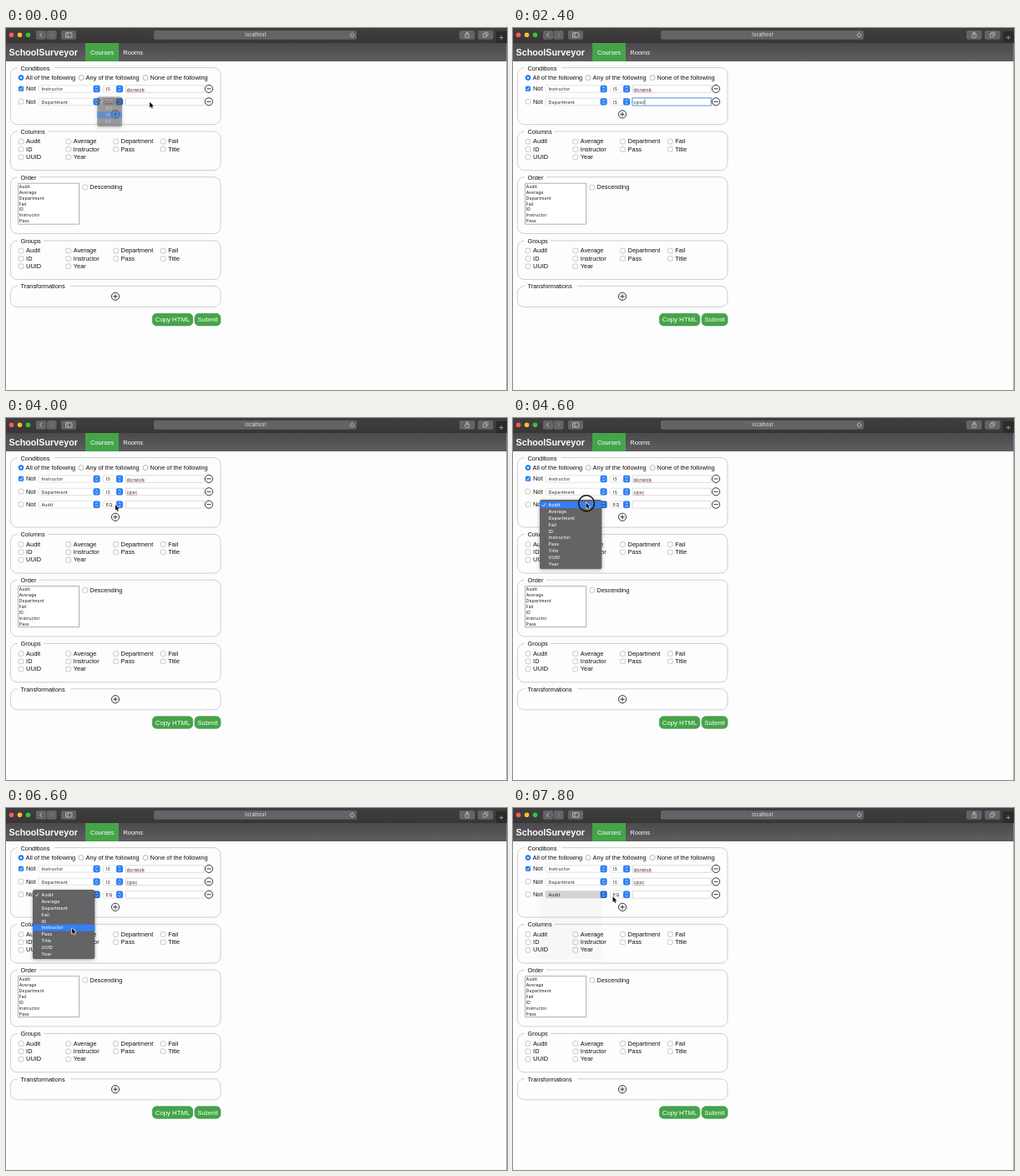
Animation of 600 by 434 pixels, one loop 8000 ms. Source, as an HTML page with a canvas:

```html
<!DOCTYPE html>
<html lang="en">
<head>
<meta charset="utf-8">
<title>Course search</title>
<style>
html, body { margin: 0; width: 100%; height: 100%; overflow: hidden; background: #fefdfe; }
canvas { display: block; width: 600px; height: 434px; }
</style>
</head>
<body>
<canvas id="stage"></canvas>
<script>
const LOOP = 8000, STEP = 200, ROW = 15.4, ITEM = 7.87;
const GREEN = '#45a449', BLUE = '#2b7ff6';
const SANS = '"Liberation Sans", Arial, sans-serif', UI = 'Inter, sans-serif';
const FIELDS = ['Audit', 'Average', 'Department', 'Fail', 'ID', 'Instructor', 'Pass', 'Title', 'UUID', 'Year'];
const OPS = ['EQ', 'GT', 'IS', 'LT'];

// Pointer path: time, x, y
const PATH = [
  [0, 172, 88.7], [3000, 172, 88.7], [3600, 131, 104], [4000, 131, 104],
  [4400, 88, 102], [4600, 87.5, 101.5], [5200, 86, 104], [5800, 79.5, 126.5],
  [6400, 79, 147], [6600, 79, 144], [7200, 79, 113.5], [7600, 103, 109],
  [7800, 119.5, 106], [8000, 119.5, 106]
];

const canvas = document.getElementById('stage');
const dpr = window.devicePixelRatio || 1;
canvas.width = 600 * dpr;
canvas.height = 434 * dpr;
const c = canvas.getContext('2d');

function pointer(t) {
  const i = PATH.findIndex(p => p[0] > t);
  const [t0, x0, y0] = PATH[i - 1], [t1, x1, y1] = PATH[i];
  const k = (t - t0) / (t1 - t0);
  return { x: x0 + (x1 - x0) * k, y: y0 + (y1 - y0) * k };
}

function box(x, y, w, h, r, fill, stroke, lw = 0.7) {
  c.beginPath();
  c.roundRect(x, y, w, h, r);
  paint(fill, stroke, lw);
}

function circle(x, y, r, fill, stroke, lw = 0.7) {
  c.beginPath();
  c.arc(x, y, r, 0, 7);
  paint(fill, stroke, lw);
}

function line(points, stroke, lw = 0.8) {
  c.beginPath();
  for (let i = 0; i < points.length; i += 2) c.lineTo(points[i], points[i + 1]);
  paint(null, stroke, lw);
}

function paint(fill, stroke, lw) {
  if (fill) { c.fillStyle = fill; c.fill(); }
  if (stroke) { c.strokeStyle = stroke; c.lineWidth = lw; c.stroke(); }
}

// Text whose capitals are centred on y
function text(str, x, y, color = '#111', size = 7.4, weight = 400, align = 'left') {
  c.font = `${weight} ${size}px ${SANS}`;
  c.letterSpacing = '0px';
  put(str, x, y + size * 0.36, color, align);
}

function small(str, x, y, color = '#222', size = 5.3, weight = 400, align = 'left') {
  c.font = `${weight} ${size}px ${UI}`;
  c.letterSpacing = '0.2px';
  put(str, x, y + size * 0.36, color, align);
}

function put(str, x, y, color, align) {
  c.fillStyle = color;
  c.textAlign = align;
  c.fillText(str, x, y);
}

function shade(y0, y1, top, bottom) {
  const g = c.createLinearGradient(0, y0, 0, y1);
  g.addColorStop(0, top);
  g.addColorStop(1, bottom);
  return g;
}

function browser() {
  box(0, 0, 600, 18, 0, shade(0, 18, '#403e3f', '#383637'));
  ['#fc5b57', '#fdbc2f', '#2bc840'].forEach((color, i) => circle(6.5 + i * 10, 8.2, 2.8, color));
  const face = '#656365', ink = '#dedede';
  [[36, 12], [48.6, 12], [66, 18], [543, 18.5], [565, 18.5]].forEach(([x, w]) => box(x, 3, w, 10.8, 2, face));
  line([43, 5.8, 40.6, 8.3, 43, 10.8], ink);
  line([53.6, 5.8, 56, 8.3, 53.6, 10.8], '#929092');
  box(71.5, 5.7, 7.4, 5.4, 0.6, null, ink);
  line([74, 5.7, 74, 11.1], ink, 0.7);
  box(550, 7, 4.6, 4.4, 0.4, null, ink, 0.6);
  line([552.3, 9, 552.3, 4.6], ink, 0.6);
  line([550.9, 6, 552.3, 4.5, 553.7, 6], ink, 0.6);
  box(573, 5.2, 4, 4, 0.4, null, ink, 0.6);
  box(571.3, 7, 4, 4, 0.4, face, ink, 0.6);
  box(177, 3, 243, 10.8, 2, face);
  small('localhost', 299, 8.4, '#f2f2f2', 5.5, 400, 'center');
  c.beginPath();
  c.arc(414.6, 8.6, 2.2, -0.6, 4.6);
  paint(null, ink, 0.7);
  line([414.3, 5.2, 415.6, 6.4, 414.3, 7.5], ink, 0.6);
  box(587, 4, 13, 14, 0, '#2c2a2b');
  line([590.7, 11.5, 595.7, 11.5], '#b5b5b5', 0.7);
  line([593.2, 9, 593.2, 14], '#b5b5b5', 0.7);

  box(0, 18, 600, 22, 0, shade(18, 40, '#4b494b', '#5f5d60'));
  text('SchoolSurveyor', 3.5, 28.8, '#fff', 10.75, 700);
  box(95, 18, 40, 22, 0, GREEN);
  text('Courses', 115, 29, '#fff', 7.5, 400, 'center');
  text('Rooms', 152.2, 29, '#fff', 7.5, 400, 'center');
  line([599.6, 18, 599.6, 434], '#8a8a8a', 0.8);
}

function fieldset(title, y, h, gap) {
  box(5.4, y, 251.6, h, 8, null, '#c9c9c9', 0.9);
  box(14, y - 2, gap, 4, 0, '#fefdfe');
  text(title, 17.5, y + 0.3);
}

function checkbox(x, y, on) {
  box(x - 2.8, y - 2.8, 5.6, 5.6, 1.2, on ? '#1a7cf8' : '#fff', on ? '#1a7cf8' : '#a5a5a5', 0.6);
  if (on) line([x - 1.5, y + 0.1, x - 0.3, y + 1.5, x + 1.6, y - 1.6], '#fff', 0.9);
}

function radio(x, label, on) {
  circle(x, 59.6, 3, on ? '#1a7cf8' : '#fff', on ? '#1a7cf8' : '#999');
  if (on) circle(x, 59.6, 1.2, '#fff');
  text(label, x + 5.6, 59.3);
}

function sign(x, y, plus, color = '#222') {
  circle(x, y, 4.6, null, color, 0.9);
  line([x - 2.6, y, x + 2.6, y], color, 0.9);
  if (plus) line([x, y - 2.6, x, y + 2.6], color, 0.9);
}

function select(label, x, w, y, pressed) {
  box(x, y - 4.1, w, 8.2, 2, pressed ? '#d8d8d8' : '#fff', '#d2d2d2', 0.6);
  const s = x + w - 8;
  box(s, y - 4.2, 8, 8.4, 2, pressed ? '#2068d8' : BLUE);
  line([s + 2.6, y - 0.9, s + 4, y - 2.4, s + 5.4, y - 0.9], '#fff', 0.7);
  line([s + 2.6, y + 0.9, s + 4, y + 2.4, s + 5.4, y + 0.9], '#fff', 0.7);
  small(label, x + 3.4, y + 0.3);
}

function condition(i, { field, op, value, on, focus, caret, marked, pressed }) {
  const y = 73 + i * ROW;
  checkbox(18, y - 0.2, on);
  text('Not', 24, y - 0.4);
  select(field, 39, 73.5, y, pressed === 'field');
  select(op, 116.4, 23.6, y, pressed === 'op');
  if (focus) box(142.6, y - 4.8, 95, 9.6, 0.8, null, '#8dbcf3', 1.3);
  box(143.3, y - 4.2, 93.6, 8.5, 0, '#fff', focus ? '#7c9cc4' : '#c4c4c4', 0.6);
  small(value, 144.6, y + 0.6);
  const end = 144.6 + c.measureText(value).width;
  if (caret) line([end + 0.4, y - 2.8, end + 0.4, y + 3.4], '#111', 0.6);
  if (marked) {
    c.setLineDash([0.9, 0.7]);
    line([144.8, y + 3.8, end, y + 3.8], '#ee5a50', 0.8);
    c.setLineDash([]);
  }
  sign(243, y - 0.1, false);
}

function checkGrid(y) {
  FIELDS.forEach((name, i) => {
    const x = 18 + (i % 4) * 56.75, cy = y + 12 + Math.floor(i / 4) * 9.35;
    checkbox(x, cy + 0.1);
    text(name, x + 6.1, cy - 0.4);
  });
}

function button(label, x, w, y) {
  box(x, y, w, 14.6, 5, GREEN, '#3b9640', 0.6);
  text(label, x + w / 2, y + 7.2, '#fff', 7.8, 400, 'center');
}

function menu(items, x, y, w, hover, alpha) {
  c.save();
  c.globalAlpha = alpha;
  c.shadowColor = 'rgba(0,0,0,.35)';
  c.shadowBlur = 4 * dpr;
  c.shadowOffsetY = dpr;
  box(x, y, w, items.length * ITEM + 4.4, 2.6, '#636264');
  c.shadowColor = 'transparent';
  if (hover >= 0) box(x, y + 2.2 + hover * ITEM, w, ITEM, 0, '#3580f7');
  items.forEach((name, i) => small(name, x + 10.6, y + 6.2 + i * ITEM, '#fff', 5.2, 500));
  line([x + 3.2, y + 6.3, x + 4.6, y + 8, x + 7, y + 4.2], '#fff', 0.8);
  c.restore();
}

function drawPointer({ x, y }, kind) {
  c.save();
  c.translate(x, y);
  c.lineJoin = 'round';
  if (kind === 'beam') {
    line([-1.4, -3.6, 0, -3, 1.4, -3.6], '#222', 0.6);
    line([0, -3, 0, 4.4], '#222', 0.7);
    line([-1.4, 5, 0, 4.4, 1.4, 5], '#222', 0.6);
  } else if (kind === 'hand') {
    c.beginPath();
    c.roundRect(-0.7, 0, 1.6, 5, 0.8);
    c.roundRect(-2, 3.4, 5.4, 4.6, 1.6);
    paint('#111', '#111', 0.9);
    box(-0.5, 0.3, 1.2, 5, 0.6, '#fff');
    box(-1.6, 3.8, 4.6, 3.8, 1.2, '#fff');
  } else {
    c.beginPath();
    [0, 0, 0, 6.8, 1.6, 5.4, 2.7, 7.9, 3.8, 7.4, 2.8, 5, 4.9, 4.9]
      .forEach((v, i, a) => { if (i % 2) c.lineTo(a[i - 1], v); });
    c.closePath();
    paint(null, '#fff', 1.2);
    paint('#111');
  }
  c.restore();
}

function draw(t) {
  c.setTransform(dpr, 0, 0, dpr, 0, 0);
  box(0, 0, 600, 434, 0, '#fefdfe');
  browser();

  const added = t >= 4000, dy = added ? ROW : 0;
  const open = t >= 4600 && t < 7800;
  const focus = t >= 400 && t < 3600;
  const typed = 'cpsc'.slice(0, t < 2000 ? 0 : t < 2200 ? 1 : t < 2400 ? 2 : 4);
  const p = pointer(t);

  fieldset('Conditions', 47.6, 68 + dy, 44);
  radio(18, 'All of the following', true);
  radio(90, 'Any of the following');
  radio(167, 'None of the following');
  condition(0, { field: 'Instructor', op: 'IS', value: 'dorwick', on: true, marked: true });
  condition(1, {
    field: 'Department', op: t < 200 ? 'EQ' : 'IS', value: typed, focus,
    caret: focus && !(t >= 1000 && t < 1400), marked: added, pressed: t < 200 && 'op'
  });
  if (added) condition(2, { field: 'Audit', op: 'EQ', value: '', pressed: t >= 4600 && 'field' });
  const overPlus = !added && Math.hypot(p.x - 131, p.y - 103.4) < 5;
  sign(131, 103.4 + dy, true, overPlus ? '#3c9c42' : '#222');

  c.save();
  c.translate(0, dy);
  fieldset('Columns', 124, 46.6, 36);
  checkGrid(124);
  fieldset('Order', 178.7, 67.8, 26);
  box(14.6, 186.2, 73, 49, 0, '#fff', '#8f8f8f', 0.7);
  FIELDS.slice(0, 7).forEach((name, i) => small(name, 15.8, 190.2 + i * 6.85, '#111', 5));
  checkbox(94.8, 191);
  text('Descending', 100.3, 190.6);
  fieldset('Groups', 255, 46.4, 31);
  checkGrid(255);
  fieldset('Transformations', 309.4, 25, 63);
  sign(131, 321.8, true);
  button('Copy HTML', 175.3, 48.5, 342.3);
  button('Submit', 226, 31, 342.3);
  c.restore();

  if (t < 200) menu(OPS, 109.2, 82.4, 29.8, 2, 0.5);
  if (open) menu(FIELDS, 32, 98, 74.3, Math.floor((p.y - 100.2) / ITEM), 0.98);
  else if (t >= 7800) menu(FIELDS, 32, 98, 74.3, -1, 0.025);

  if (t === 3800) circle(131.5, 104, 14, null, '#111', 1.5);
  if (t === 4600) circle(88, 102.3, 9.5, null, '#111', 1.5);

  const hidden = t >= 2000 && t < 3000;
  const overInput = t >= 200 && p.x > 143 && p.y < 94;
  if (!hidden) drawPointer(p, overInput ? 'beam' : overPlus ? 'hand' : 'arrow');
}

function frame(now) {
  draw(Math.floor(now % LOOP / STEP) * STEP);
  requestAnimationFrame(frame);
}
requestAnimationFrame(frame);
</script>
</body>
</html>
```
